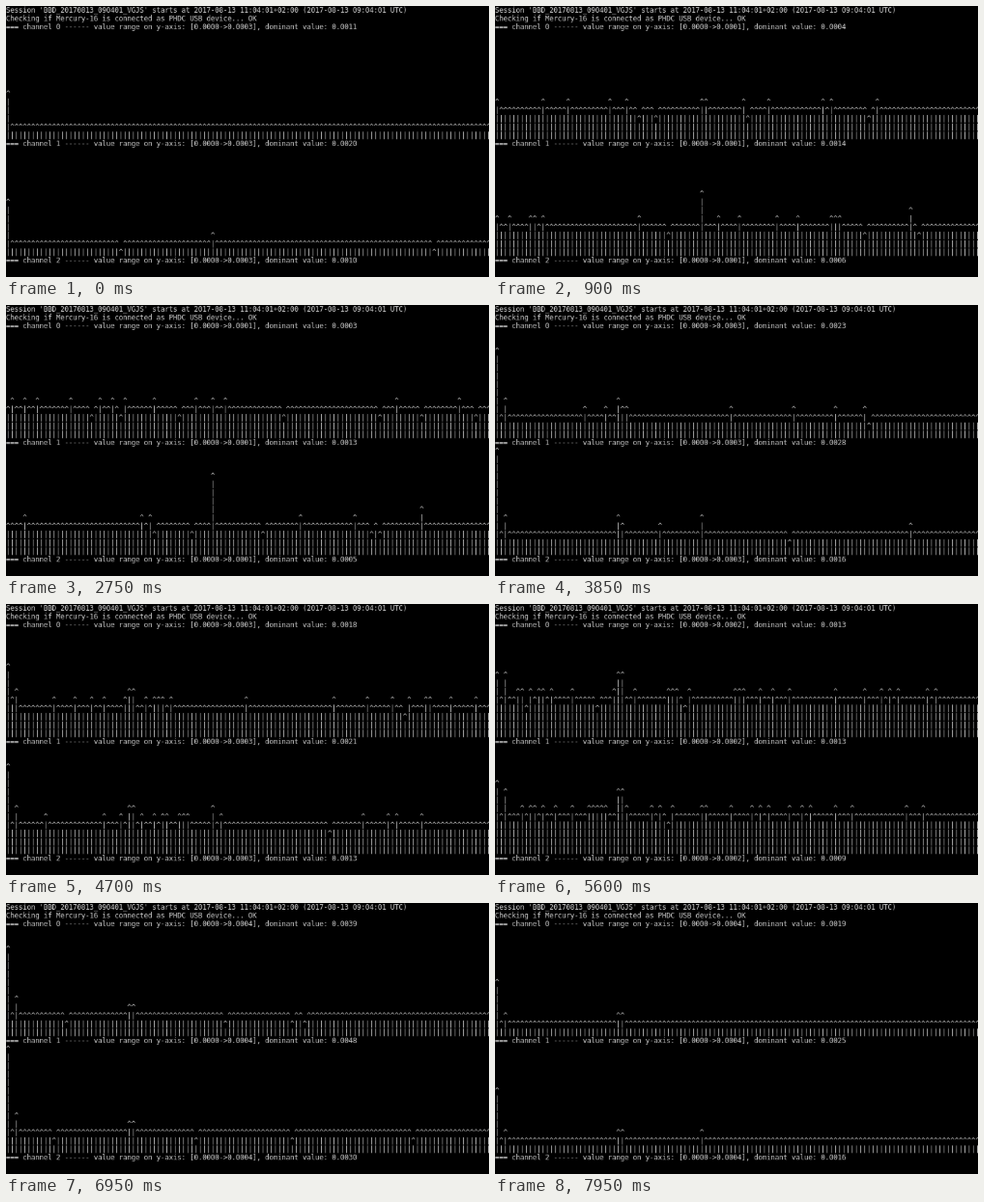
Recreate the animation shown at these times as an HTML page with a canvas. Size 500 px wide and 281 px high, loop 8000 ms.

```html
<!DOCTYPE html>
<html lang="en">
<head>
<meta charset="utf-8">
<title>Channel spectra</title>
<style>
  html, body { margin: 0; width: 100%; height: 100%; overflow: hidden; background: #000; }
  canvas { display: block; }
</style>
</head>
<body>
<canvas width="500" height="281"></canvas>
<script>
const LOOP = 8000, TICK = 50;
const CELL_W = 7, CELL_H = 14, BASELINE = 11, SCALE = 0.6178;
const COLUMNS = 116, ROWS = 33, PANEL_ROWS = 14, MAX_HEIGHT = 13;

// Spectrum columns that stand out, and how strongly each channel shows them.
const LOW = 2, ALPHA = 29.4, MAINS = 49, HARMONIC = 99;
const DC_GAIN = [1, 1.25, 1], MAINS_GAIN = [0.2, 1, 0.2];

// level: height of the noise floor in rows; bumps and dips: share of columns
// one row above or below it; dc, low, alpha, mains: rows the peaks add.
const quiet = { range: 1, level: 4, bumps: 0.09, dips: 0.05, dc: 0, low: 0, alpha: 0, mains: 5, values: [3, 13, 5] };
const scenes = [
  { at: 0, range: 3, level: 2, bumps: 0, dips: 0.01, dc: 4, low: 0, alpha: 0, mains: 1, values: [11, 20, 10] },
  { at: 1050, ...quiet },
  { at: 2750, ...quiet, mains: 6 },
  { at: 3850, range: 3, level: 3, bumps: 0.06, dips: 0.01, dc: 8, low: 2, alpha: 2, mains: 2, values: [23, 28, 16] },
  { at: 5600, range: 2, level: 5, bumps: 0.22, dips: 0.01, dc: 3, low: 3, alpha: 4, mains: 1, values: [13, 13, 9] },
  { at: 6950, range: 4, level: 3, bumps: 0.01, dips: 0.03, dc: 8, low: 2, alpha: 1, mains: 0, values: [39, 48, 30] },
  { at: 7950, range: 4, level: 2, bumps: 0, dips: 0.015, dc: 5, low: 1, alpha: 1, mains: 1, values: [19, 25, 16] }
];

// The terminal is drawn at its full size, then shrunk onto the stage.
const stage = document.querySelector('canvas').getContext('2d');
const terminal = document.createElement('canvas');
terminal.width = COLUMNS * CELL_W;
terminal.height = ROWS * CELL_H;
const ctx = terminal.getContext('2d');
ctx.font = '12px "DejaVu Sans Mono", monospace';
stage.imageSmoothingQuality = 'high';

function blend(a, b, k) {
  if (Array.isArray(a)) return a.map((value, i) => blend(value, b[i], k));
  return a + (b - a) * k;
}

function sceneAt(time) {
  const i = scenes.findLastIndex(scene => scene.at <= time);
  const a = scenes[i], b = scenes[i + 1] ?? a;
  const progress = a === b ? 0 : (time - a.at) / (b.at - a.at);
  const scene = { unrest: Math.sin(Math.PI * progress) };
  for (const key in a) scene[key] = blend(a[key], b[key], progress);
  return scene;
}

function random(a, b, c) {
  const n = Math.sin(a * 12.9898 + b * 78.233 + c * 37.719) * 43758.5453;
  return n - Math.floor(n);
}

function heightAt(scene, index, column, tick) {
  // Each column keeps its random value for three ticks, out of step with the others.
  const phase = random(column, index, 1) * 3;
  const noise = random(column, index, Math.floor(tick / 3 + phase) + 7);
  const mains = scene.mains * MAINS_GAIN[index];

  let peak = scene.alpha * Math.exp(-((column - ALPHA) ** 2) / 0.9);
  if (column === 0) peak = scene.dc * DC_GAIN[index] * (1 + 0.3 * (noise - 0.5) * scene.unrest);
  if (column === LOW) peak = scene.low;
  if (column === MAINS) peak = mains;
  if (column === HARMONIC) peak = mains * 0.35;

  const level = Math.round(scene.level);
  const rise = Math.round(peak);
  if (rise > 0) return Math.min(MAX_HEIGHT, level + rise);

  const bumps = scene.bumps * (1.5 - column / COLUMNS);
  return level + (noise > 1 - bumps) - (noise < scene.dips);
}

function put(char, column, row) {
  ctx.fillText(char, column * CELL_W, row * CELL_H + BASELINE);
}

function print(text, row) {
  [...text].forEach((char, column) => put(char, column, row));
}

function drawColumn(column, bottom, height) {
  const top = bottom - height + 1;
  put('^', column, top);
  for (let row = top + 1; row <= bottom && row < ROWS; row++) put('|', column, row);
}

const decimal = n => (Math.round(n) / 10000).toFixed(4);

function draw(tick) {
  const scene = sceneAt(tick * TICK);
  ctx.fillStyle = '#000';
  ctx.fillRect(0, 0, terminal.width, terminal.height);
  ctx.fillStyle = '#d0d0d0';

  print("Session 'BBD_20170813_090401_VGJS' starts at 2017-08-13 11:04:01+02:00 (2017-08-13 09:04:01 UTC)", 0);
  print('Checking if Mercury-16 is connected as PHDC USB device... OK', 1);

  scene.values.forEach((value, index) => {
    const header = 2 + index * PANEL_ROWS;
    print(`=== channel ${index} ------ value range on y-axis: [0.0000->${decimal(scene.range)}], dominant value: ${decimal(value)}`, header);
    for (let column = 0; column < COLUMNS; column++) {
      drawColumn(column, header + MAX_HEIGHT, heightAt(scene, index, column, tick));
    }
  });

  stage.drawImage(terminal, 0, 0, terminal.width * SCALE, terminal.height * SCALE);
}

let shown = -1;
function frame(now) {
  let tick = Math.floor((now % LOOP) / TICK);
  if (tick === 1) tick = 0; // the opening picture holds twice as long
  if (tick !== shown) draw(shown = tick);
  requestAnimationFrame(frame);
}
draw(0);
requestAnimationFrame(frame);
</script>
</body>
</html>
```
